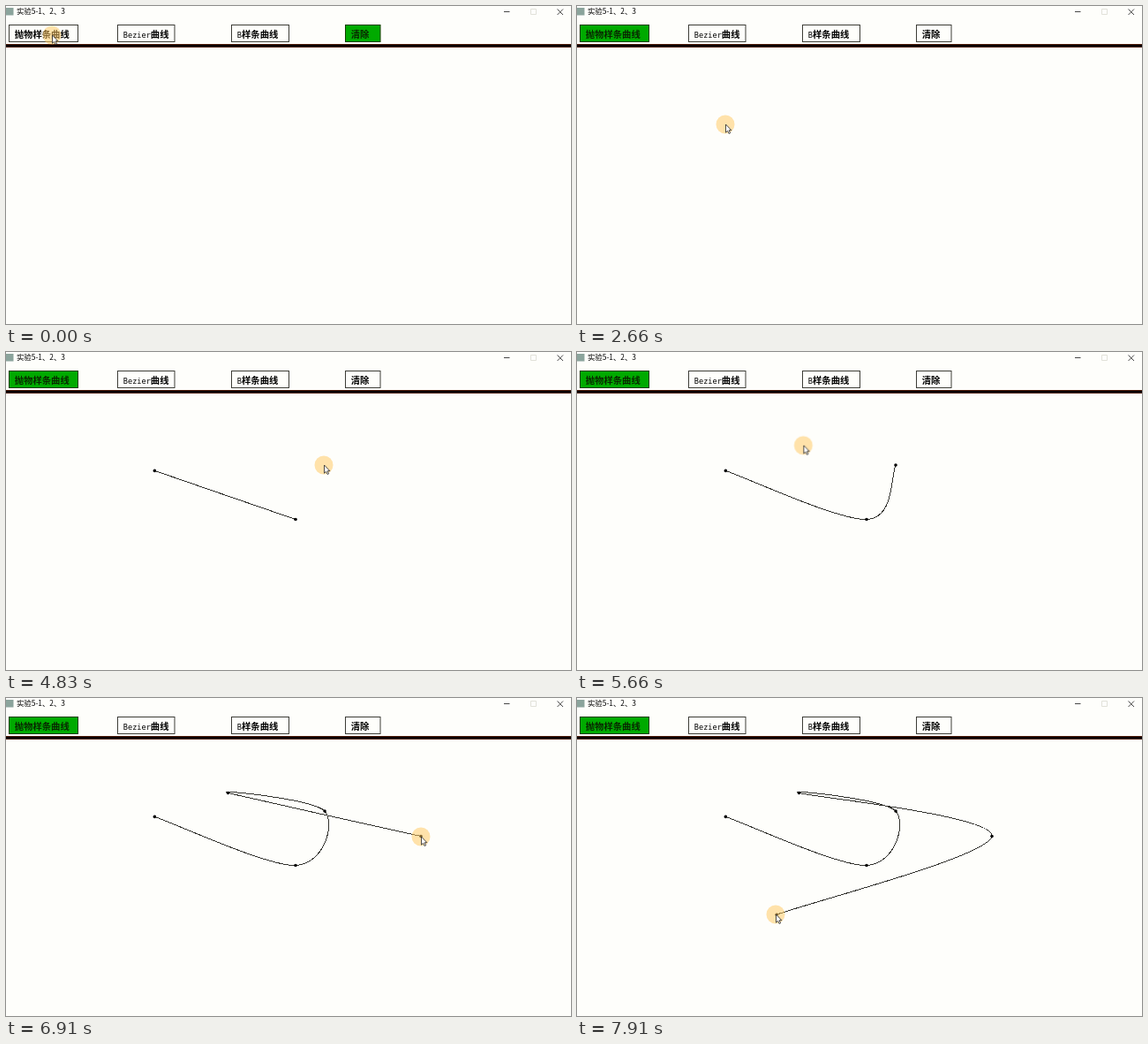
These frames come from a looping animation (640x360 px, 8000 ms). An HTML page:

```html
<!DOCTYPE html>
<html lang="zh">
<head>
<meta charset="utf-8">
<title>曲线</title>
<style>
  html, body { margin: 0; width: 100%; height: 100%; overflow: hidden; background: #fefefb; }
  svg { display: block; width: 640px; height: 360px; }
  text { fill: #000; white-space: pre; }
  .title { font: 8.4px "Noto Sans CJK SC", "Noto Sans CJK", sans-serif; }
  .button text { font: bold 10.33px "Noto Sans Mono CJK SC", "Noto Sans CJK SC", "Noto Sans CJK", monospace; }
  .button .latin { font: 8.6px "DejaVu Sans Mono", monospace; }
  .button rect { fill: #fefefb; stroke: #3c3c36; }
  .button.on rect { fill: #00aa00; stroke: #123c00; }
  .button.on text { fill: #082800; }
</style>
</head>
<body>
<svg viewBox="0 0 640 360">
  <rect width="640" height="360" fill="#fefefb"/>
  <rect y="2" width="8.5" height="8.5" fill="#8ba49c"/>
  <text class="title" x="12" y="9.4">实验5-1、2、3</text>
  <g fill="none" stroke="#333" stroke-width=".9">
    <path d="M564 6.5h6.5"/>
    <path d="M594.5 3.5h6v6h-6z" stroke="#deded6"/>
    <path d="M624.5 3.5l6.5 6.5m0-6.5l-6.5 6.5"/>
  </g>
  <g id="buttons"></g>
  <rect y="43" width="640" height="4" fill="#4a1808"/>
  <rect y="44" width="640" height="2" fill="#0a0000"/>
  <path id="curve" fill="none" stroke="#33332e" shape-rendering="crispEdges"/>
  <g id="dots"></g>
  <g id="cursor">
    <circle r="10.5" fill="#ffc860" fill-opacity=".52"/>
    <path d="M.5 0v9.2l2.1-1.9 1.5 3.2 1.5-.7-1.4-3.1h2.7z" fill="#fff" stroke="#222" stroke-width=".8"/>
  </g>
</svg>
<script>
const LOOP = 8000, STEP = 1000 / 12;
const $ = id => document.getElementById(id);

const BUTTONS = [[3.5, 78, '抛物样条曲线'], [126.5, 64.5, 'Bezier曲线'], [255.5, 65, 'B样条曲线'], [384.5, 39.5, '清除']];
const SWITCH_STEP = 2;

// x, y, step at which the point is placed
const POINTS = [
  [168.4, 134.4, 33], [328, 189.5, 43], [361, 128, 59],
  [251.5, 107.5, 73], [470, 156.5, 83], [226.2, 245.2, 95]
];

// step, x, y, easing towards the next stop
const STOPS = [
  [0, 52, 33], [15, 52, 33], [16, 80, 53, 'ease-out'],
  [21, 168, 134], [32, 168, 134, 'ease-in-out'],
  [38, 327, 189], [45, 327, 189, 'ease-in-out'],
  [52, 360, 128], [62, 360, 128, 'ease-in-out'],
  [67, 268, 103, 'ease-out'], [69, 251, 107], [73, 251, 107, 'ease-in-out'],
  [77, 454, 167, 'ease-out'], [78.5, 464, 189, 'ease-in-out'],
  [81, 470, 157], [84, 470, 157, 'ease-in'],
  [89, 371, 237, 'linear'], [92, 262, 249, 'ease-out'],
  [94, 225, 245], [96, 225, 245]
];

const markLatin = label => label.replace(/[A-Za-z]+/, '<tspan class="latin">$&</tspan>');
$('buttons').innerHTML = BUTTONS.map(([x, w, label]) =>
  `<g class="button"><rect x="${x}" y="21.5" width="${w}" height="19"/><text x="${x + 6.3}" y="35.8">${markLatin(label)}</text></g>`
).join('');
$('dots').innerHTML = POINTS.map(([x, y]) => `<circle cx="${x}" cy="${y}" r="1.8"/>`).join('');

const motion = $('cursor').animate(
  STOPS.map(([step, x, y, easing = 'linear']) =>
    ({ offset: step / 96, transform: `translate(${x}px, ${y}px)`, easing })),
  { duration: LOOP, fill: 'both' }
);
motion.pause();

// Parabolic blending with the end points doubled
function splinePath(points) {
  if (points.length < 2) return '';
  const at = i => points[Math.max(0, Math.min(points.length - 1, i))];
  const control = (i, sign) =>
    [0, 1].map(k => at(i)[k] + sign * (at(i + 1)[k] - at(i - 1)[k]) / 6);
  let path = `M${at(0)[0]} ${at(0)[1]}`;
  for (let i = 1; i < points.length; i++)
    path += `C${control(i - 1, 1)} ${control(i, -1)} ${at(i)[0]} ${at(i)[1]}`;
  return path;
}

function draw(step) {
  const active = step < SWITCH_STEP ? 3 : 0;
  [...$('buttons').children].forEach((b, i) => b.classList.toggle('on', i === active));
  const placed = POINTS.filter(p => step >= p[2]);
  [...$('dots').children].forEach((dot, i) => dot.style.display = i < placed.length ? '' : 'none');
  $('curve').setAttribute('d', splinePath(placed));
  motion.currentTime = step * STEP;
}

// Steps begin slightly early because frame delays are whole centiseconds
const LEAD = 25;
const start = performance.now();
let shown = -1;
function tick() {
  const step = Math.floor((performance.now() - start + LEAD) % LOOP / STEP);
  if (step !== shown) draw(shown = step);
  requestAnimationFrame(tick);
}
tick();
</script>
</body>
</html>
```
